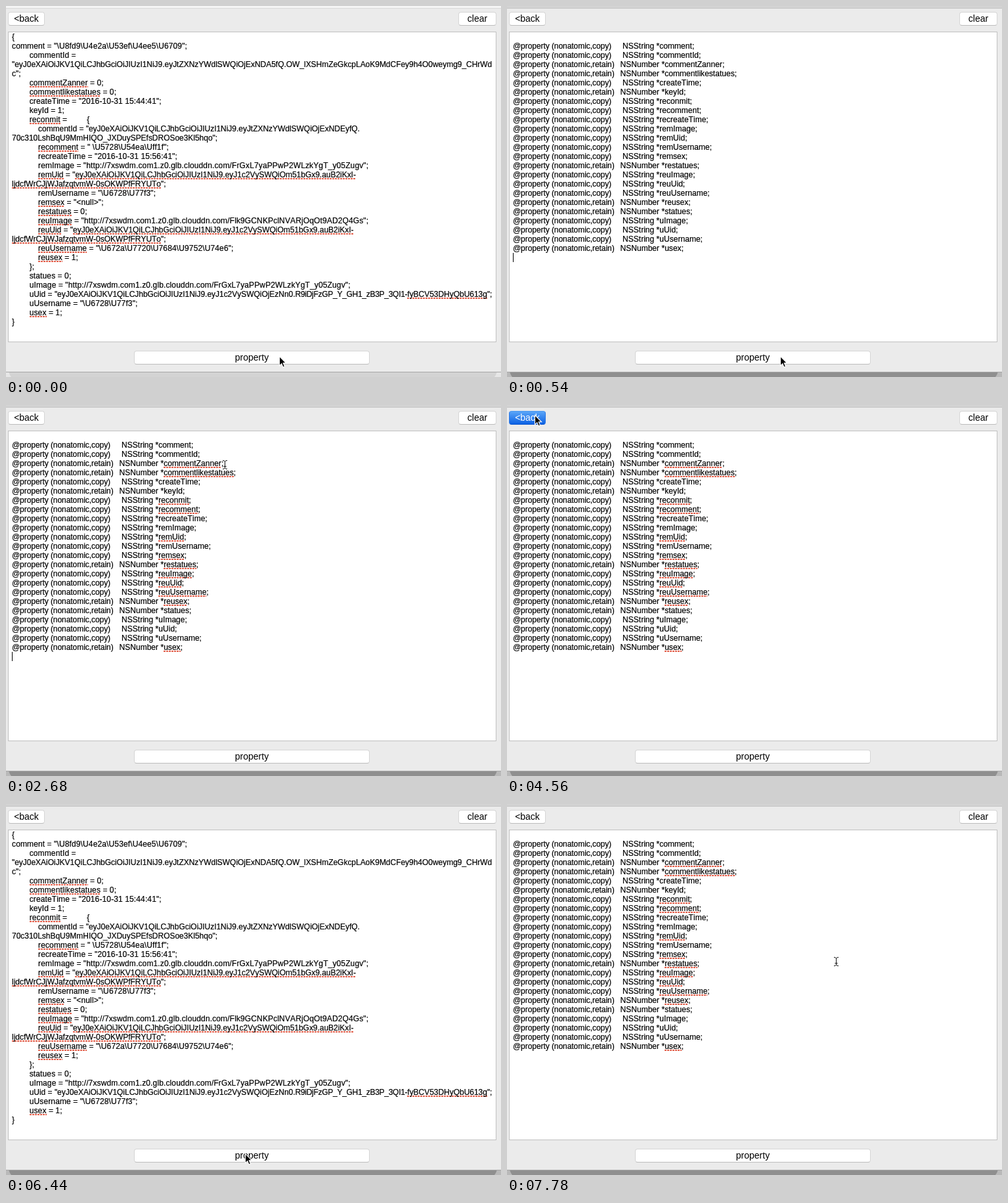
Recreate the animation shown at these times as an HTML page. Size 754 by 565 pixels, loop 8 s.

```html
<!DOCTYPE html>
<html lang="en">
<head>
<meta charset="utf-8">
<title>Property generator</title>
<style>
html, body { margin: 0; width: 100%; height: 100%; overflow: hidden; }
body { position: relative; background: #ebebeb; color: #000; font: 12px/14px "Liberation Sans", Arial, sans-serif; font-kerning: none; }
body > *, svg { position: absolute; }

.anim, u { animation: 8s step-end infinite; }

/* desktop showing around the window */
.top { left: 0; top: 0; width: 754px; height: 3px; border-bottom: 1px solid #c3c3c3; background: #d3d3d3; animation-name: topTone; }
.bottom { left: 0; top: 557px; width: 754px; height: 8px; overflow: hidden; background: #b9b9b9; animation-name: edgeTone; }
.bottom div { position: absolute; left: 4px; top: -20px; width: 744px; height: 34px; border-radius: 18px; background: #8f8f8f; animation-name: bottomTone; }
.bottom::after { content: ""; position: absolute; left: 0; top: 0; width: 100%; height: 1px; background: #a6a6a6; }

.box { left: 3px; top: 39px; width: 742px; height: 471px; border: 1px solid #c0c0c0; background: #fff; }

.btn { box-sizing: border-box; height: 21px; border: 1px solid #d6d6d6; border-bottom-color: #bdbdbd; border-radius: 4px; background: #fff; font-size: 14px; line-height: 19px; text-align: center; }
.back { left: 3px; top: 9px; width: 56px; animation-name: press; }
.clear { left: 689px; top: 9px; width: 58px; }
.prop { left: 195px; top: 525px; width: 359px; }

.json, .list { left: 9px; margin: 0; font: inherit; white-space: pre; -webkit-text-stroke: .2px; }
.json { top: 40px; letter-spacing: .13px; word-spacing: -.13px; animation-name: json; }
.json span { letter-spacing: -.03px; word-spacing: .03px; }
.json i { font-style: normal; letter-spacing: -.28px; }
u { text-decoration: none; background: repeating-linear-gradient(90deg, #e2604c 0 3px, transparent 3px 4px) left bottom / 100% 2px no-repeat; animation-name: spell; }
.list { top: 54px; animation-name: list; }
.list div { position: relative; height: 14px; letter-spacing: -.06px; }
.list b { position: absolute; left: 167px; font-weight: normal; letter-spacing: .03px; }
.list .num { left: 163.5px; }

.caret { left: 9px; top: 376px; width: 1px; height: 14px; background: #000; animation-name: caret; }
.ptr { left: 0; top: 0; animation-name: move; }
.ptr svg { left: 0; top: 0; overflow: visible; }
.arrow { animation-name: arrow; }
.beam { animation-name: beam; }

@keyframes topTone { 0% { background: #f5f5f5; border-color: #d9d9d9 } 3.375%, 100% { background: #d3d3d3; border-color: #c3c3c3 } }
@keyframes edgeTone { 0% { background: #e6e6e6 } 3.375%, 100% { background: #b9b9b9 } }
@keyframes bottomTone { 0% { background: #d3d3d3 } 3.375%, 100% { background: #8f8f8f } }
@keyframes press {
  0%, 60.375%, 100% { background: #fff; color: #000; border-color: #d6d6d6 #d6d6d6 #bdbdbd }
  57% { background: linear-gradient(#5aa5f8, #0d62e4); color: #fff; border-color: #4a97f0 #2c78e4 #0a55cf }
}
@keyframes json { 0%, 60.375% { opacity: 1 } 6.75%, 87.125%, 100% { opacity: 0 } }
@keyframes list { 0%, 60.375% { opacity: 0 } 6.75%, 87.125%, 100% { opacity: 1 } }
@keyframes spell {
  0%, 10.125%, 63.75%, 93.875%, 100% { background-size: 100% 2px }
  6.75%, 60.375%, 87.125% { background-size: 0 0 }
}
@keyframes caret {
  0%, 13.5%, 26.875%, 40.25%, 53.625% { opacity: 0; transform: none }
  6.75%, 20.125%, 33.5%, 47% { opacity: 1; transform: none }
  60.375%, 73.75% { opacity: 1; transform: translate(3px, 98px) }
  67.125%, 80.5%, 100% { opacity: 0; transform: translate(3px, 98px) }
}
@keyframes arrow { 0%, 40.25%, 77.125% { opacity: 1 } 16.875%, 63.75%, 93.875%, 100% { opacity: 0 } }
@keyframes beam { 0%, 40.25%, 77.125% { opacity: 0 } 16.875%, 63.75%, 93.875%, 100% { opacity: 1 } }
@keyframes move {
  0%, 13.5% { transform: translate(416px, 533px) }
  16.875% { transform: translate(396px, 63px) }
  20.125% { transform: translate(374px, 430px) }
  26.875% { transform: translate(318px, 142px) }
  30.25% { transform: translate(330px, 104px) }
  33.5% { transform: translate(333px, 91px) }
  36.875% { transform: translate(252px, 64px) }
  40.25% { transform: translate(99px, 30px) }
  43.625% { transform: translate(38px, 20px) }
  47% { transform: translate(48px, 16px) }
  50.25% { transform: translate(43px, 16px) }
  53.625% { transform: translate(42px, 15px) }
  63.75% { transform: translate(64px, 45px) }
  67.125% { transform: translate(180px, 200px) }
  70.375% { transform: translate(291px, 352px) }
  73.75% { transform: translate(339px, 418px) }
  77.125% { transform: translate(370px, 515px) }
  80.5% { transform: translate(364px, 532px) }
  93.875% { transform: translate(493px, 312px) }
  97.25%, 100% { transform: translate(501px, 240px) }
}
</style>
</head>
<body>
<div class="top anim"></div>
<div class="bottom anim"><div class="anim"></div></div>
<div class="btn back anim">&lt;back</div>
<div class="btn clear">clear</div>
<div class="box"></div>
<div class="btn prop">property</div>

<pre class="json anim">{
comment = "\U8fd9\U4e2a\U53ef\U4ee5\U6709";
        commentId =
<span>"eyJ0eXAiOiJKV1QiLCJhbGciOiJIUzI1NiJ9.eyJtZXNzYWdlSWQiOjExNDA5fQ.OW_lXSHmZeGkcpLAoK9MdCFey9h4O0weymg9_CHrWd
c";</span>
        <u>commentZanner</u> = 0;
        <u>commentlikestatues</u> = 0;
        createTime = "2016-10-31 15:44:41";
        keyId = 1;
        <u>reconmit</u> =         {
            <span>commentId = "eyJ0eXAiOiJKV1QiLCJhbGciOiJIUzI1NiJ9.eyJtZXNzYWdlSWQiOjExNDEyfQ.
70c310LshBqU9MmHIQO_JXDuySPEfsDROSoe3Kl5hqo";</span>
            <u>recomment</u> = " \U5728\U54ea\Uff1f";
            recreateTime = "2016-10-31 15:56:41";
            remImage = "http://7xswdm.com1.z0.glb.clouddn.com/FrGxL7yaPPwP2WLzkYgT_y05Zugv";
            <span><u>remUid</u> = "<u>eyJ0eXAiOiJKV1QiLCJhbGciOiJIUzI1NiJ9.eyJ1c2VySWQiOm51bGx9.auB2iKxI-</u>
<u>ljdcfWrCJjWJafzqtvmW-0sOKWPfFRYUTo</u>";</span>
            remUsername = "\U6728\U77f3";
            <u>remsex</u> = "&lt;null&gt;";
            <u>restatues</u> = 0;
            <u>reuImage</u> = "http://7xswdm.com1.z0.glb.clouddn.com/Flk9GCNKPclNVARjOqOt9AD2Q4Gs";
            <span><u>reuUid</u> = "<u>eyJ0eXAiOiJKV1QiLCJhbGciOiJIUzI1NiJ9.eyJ1c2VySWQiOm51bGx9.auB2iKxI-</u>
<u>ljdcfWrCJjWJafzqtvmW-0sOKWPfFRYUTo</u>";</span>
            <u>reuUsername</u> = "\U672a\U7720\U7684\U9752\U74e6";
            <u>reusex</u> = 1;
        };
        statues = 0;
        uImage = "http://7xswdm.com1.z0.glb.clouddn.com/FrGxL7yaPPwP2WLzkYgT_y05Zugv";
        <span>uUid = "eyJ0eXAiOiJKV1QiLCJhbGciOiJIUzI1NiJ9.eyJ1c2VySWQiOjEzNn0.<i>R9iDjFzGP_Y_GH1_zB3P_3QI1-</i><u>fyBCV53DHyQbU613g</u>";</span>
        uUsername = "\U6728\U77f3";
        <u>usex</u> = 1;
}</pre>

<div class="list anim"></div>
<div class="caret anim"></div>

<div class="ptr anim">
  <svg class="arrow anim" width="12" height="18"><path d="M.5 .5V14.8L3.8 11.7 6 17 8.5 16 6.3 10.8H10.6Z" fill="#000" stroke="#fff" stroke-width="1.1"/></svg>
  <svg class="beam anim" width="8" height="14" fill="none">
    <path d="M-3-6.5Q0-6.5 .5-5 1-6.5 4-6.5M.5-5V5M-3 6.5Q0 6.5 .5 5 1 6.5 4 6.5M-1.5 2.5H2.5" stroke="#fff" stroke-width="2" opacity=".7"/>
    <path d="M-3-6.5Q0-6.5 .5-5 1-6.5 4-6.5M.5-5V5M-3 6.5Q0 6.5 .5 5 1 6.5 4 6.5M-1.5 2.5H2.5" stroke="#111"/>
  </svg>
</div>

<script>
// "#" marks a number field, "!" a word the spell checker underlines
const fields = "comment commentId #!commentZanner #!commentlikestatues createTime #keyId !reconmit " +
  "!recomment recreateTime remImage !remUid remUsername !remsex #!restatues !reuImage !reuUid " +
  "!reuUsername #!reusex #statues uImage uUid uUsername #!usex";

document.querySelector(".list").innerHTML = fields.split(" ").map(field => {
  const num = field.includes("#");
  const word = field.replace(/[#!]/g, "");
  const name = field.includes("!") ? `<u>${word}</u>` : word;
  return `<div>@property (nonatomic,${num ? "retain" : "copy"})` +
    `<b class="${num ? "num" : "str"}">${num ? "NSNumber" : "NSString"} *${name};</b></div>`;
}).join("");
</script>
</body>
</html>
```
